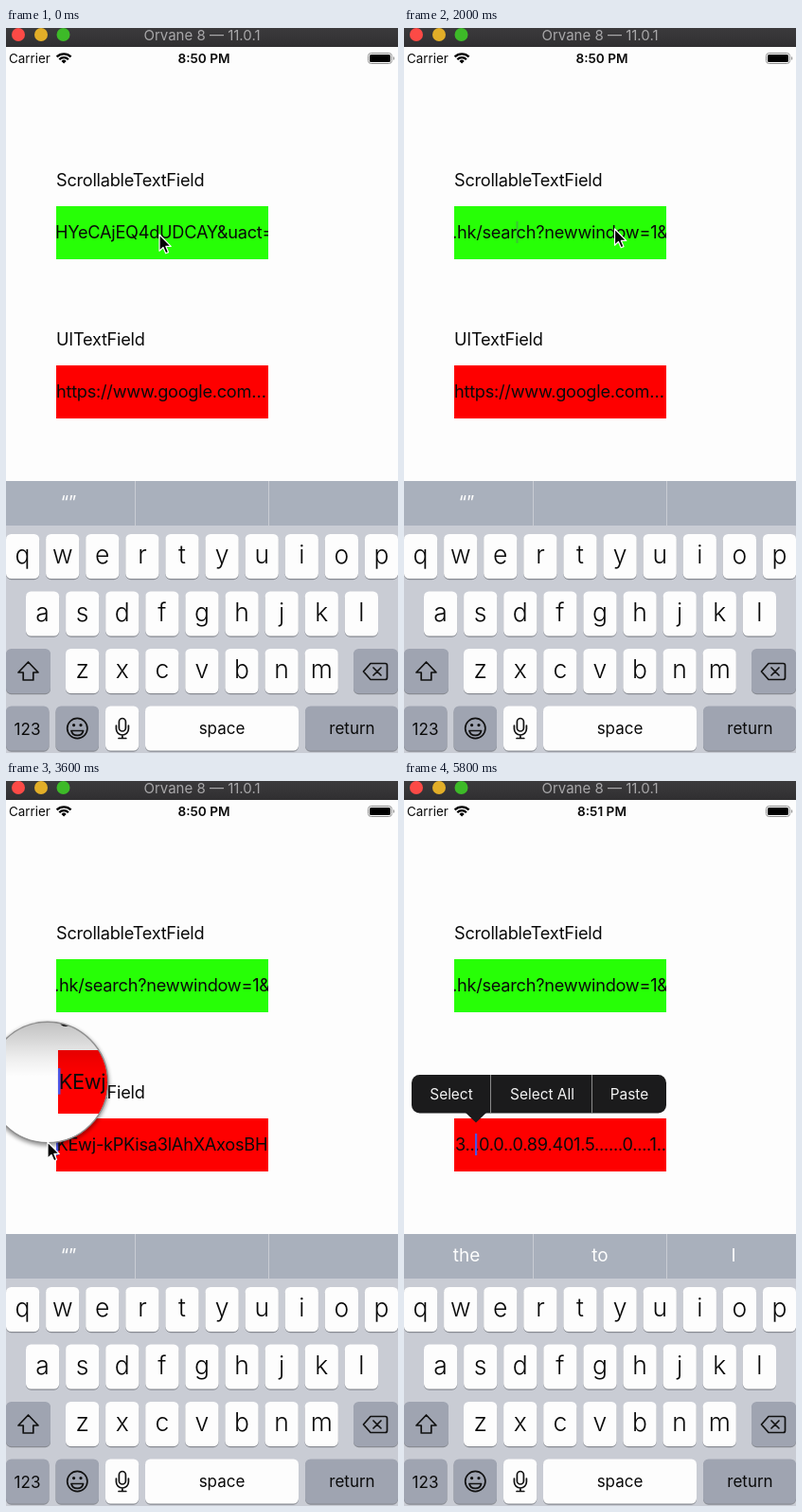
An HTML page for the animation above (6 s loop, 414 by 765 pixels).

```html
<!DOCTYPE html>
<html lang="en">
<head>
<meta charset="utf-8">
<title>Scrollable text field</title>
<style>
  html, body { margin: 0; width: 100%; height: 100%; overflow: hidden; background: #fdfdfd; }
  svg { display: block; }
  text { font-family: Inter, Roboto, "Liberation Sans", sans-serif; fill: #0a0a0a; white-space: pre; }
  .field { font-size: 18.2px; letter-spacing: -.26px; }
  .mid { text-anchor: middle; }
  .letter { font-size: 26.5px; font-weight: 350; }
  .cap { font-size: 17px; }
  .word { font-size: 19px; fill: #fdfdfd; }
  .menu { font-size: 15.4px; fill: #f4f4f4; }
  .icon { fill: none; stroke: #111; stroke-width: 1.7; stroke-linejoin: round; stroke-linecap: round; }
</style>
</head>
<body>
<svg width="414" height="765" viewBox="0 0 414 765">
  <defs>
    <linearGradient id="bar" x2="0" y2="1">
      <stop offset="0" stop-color="#3b3a3c"/><stop offset="1" stop-color="#302f31"/>
    </linearGradient>
    <linearGradient id="shade" x2="0" y2="1">
      <stop offset="0" stop-color="#000" stop-opacity=".24"/>
      <stop offset=".3" stop-color="#000" stop-opacity=".06"/>
      <stop offset=".45" stop-color="#000" stop-opacity="0"/>
    </linearGradient>
    <filter id="soft" x="-20%" y="-20%" width="140%" height="140%">
      <feGaussianBlur stdDeviation="2"/>
    </filter>
    <clipPath id="lens"><circle r="63.5"/></clipPath>
  </defs>

  <g id="page">
    <rect width="414" height="765" fill="#fdfdfd"/>
    <text class="field" x="53" y="167">ScrollableTextField</text>
    <text class="field" x="53" y="335">UITextField</text>
    <svg x="53" y="188" width="224" height="56">
      <rect width="224" height="56" fill="#27ff06"/>
      <rect id="greenCaret" x="65.5" y="16" width="2" height="23" fill="#4a9a55" opacity=".6"/>
      <text id="green" class="field" y="34"></text>
    </svg>
    <svg x="53" y="356" width="224" height="56">
      <rect width="224" height="56" fill="#fe0000"/>
      <text id="short" class="field" y="34">https://www.google.com…</text>
      <text id="red" class="field" y="34"></text>
      <rect id="redCaret" y="16" width="2.2" height="23" fill="#4a55e6"/>
    </svg>
  </g>

  <g id="status">
    <text x="3" y="36.5" font-size="13.4">Carrier</text>
    <g fill="none" stroke="#000" stroke-width="2.3">
      <path d="M53.6 30.4A10.6 10.6 0 0 1 68.6 30.4M56.3 33.2A6.8 6.8 0 0 1 65.9 33.2"/>
      <path d="M61.1 37.6L58.5 34.9A3.7 3.7 0 0 1 63.7 34.9Z" fill="#000" stroke="none"/>
    </g>
    <text id="clock" class="mid" x="209" y="36.5" font-size="13.6" font-weight="600"></text>
    <rect x="382.5" y="26.5" width="25" height="11" rx="3" fill="none" stroke="#8c8c8c"/>
    <rect x="384" y="28" width="22" height="8" rx="1.6"/>
    <path d="M409 30a2.2 2.2 0 0 1 0 4z" fill="#8c8c8c"/>
  </g>
  <g>
    <rect width="414" height="20" fill="url(#bar)"/>
    <circle cx="13" cy="7" r="7" fill="#fc4a46"/>
    <circle cx="37" cy="7" r="7" fill="#e2ae28"/>
    <circle cx="60.5" cy="7" r="7" fill="#3dba28"/>
    <text class="mid" x="207" y="13.3" font-size="15" style="fill:#a8a7a9">Orvane 8 — 11.0.1</text>
  </g>

  <g id="keyboard"></g>

  <g id="menu">
    <path d="M65 350H87L76 360.5Z" fill="#1b1b1c"/>
    <rect x="8" y="310" width="269" height="40.5" rx="8.5" fill="#1b1b1c"/>
    <path d="M91.5 310V350.5M198.5 310V350.5" stroke="#8b8b8b"/>
    <text class="menu mid" x="50" y="336">Select</text>
    <text class="menu mid" x="146" y="336">Select All</text>
    <text class="menu mid" x="238" y="336">Paste</text>
  </g>

  <g id="loupe">
    <circle cy="2" r="65" fill="#000" opacity=".4" filter="url(#soft)"/>
    <g clip-path="url(#lens)">
      <use id="zoom" href="#page"/>
      <circle r="64" fill="url(#shade)"/>
    </g>
    <circle r="63.7" fill="none" stroke="#8f8f8f" stroke-width="1.4"/>
  </g>

  <path id="pointer" d="M0 0V17.2L4 13.5L6.7 19.8L9.5 18.6L6.9 12.4H12.2Z"
        fill="#050505" stroke="#fff" stroke-width="1.2" stroke-linejoin="round"/>
</svg>

<script>
const LOOP = 6000, STEP = 200, LEFT = 53;
const URL_TEXT = 'https://www.google.com.hk/search?newwindow=1&ei=kL-sXb6jDMCNr7wPh4WKiAM' +
  '&q=scroll&oq=scroll&gs_l=psy-ab.3...0.0..0.89.401.5......0....1..gws-wiz.......0i71' +
  '&ved=0ahUKEwj-kPKisa3lAhXAxosBHYeCAjEQ4dUDCAY&uact=5';
const $ = id => document.getElementById(id);

// Keyboard
const key = (x, y, w, fill = '#fdfdfd', h = 47) =>
  `<rect x="${x}" y="${y + 1.2}" width="${w}" height="${h}" rx="5.5" fill="#888b92"/>` +
  `<rect x="${x}" y="${y}" width="${w}" height="${h}" rx="5.5" fill="${fill}"/>`;
const label = (cls, x, y, s) => `<text class="${cls} mid" x="${x}" y="${y}">${s}</text>`;
const GREY = '#9fa4b1';

function keyboard() {
  let out = '<rect y="478" width="414" height="287" fill="#c9ccd4"/>' +
    '<rect y="478" width="414" height="47" fill="#a9b0bc"/>' +
    '<path d="M136.5 478V525M277.5 478V525" stroke="#c9ccd4"/>';
  const rows = [['qwertyuiop', 0, 534], ['asdfghjkl', 21, 594.5], ['zxcvbnm', 63, 655]];
  for (const [chars, x0, y] of rows) {
    [...chars].forEach((c, i) => {
      const x = x0 + i * 42.1;
      out += key(x, y, 35.2) + label('letter', x + 17.6, y + 31.3, c);
    });
  }
  out += key(0, 655, 47, GREY) + key(367, 655, 47, GREY) +
    key(0, 715.5, 45.5, GREY) + key(52.5, 715.5, 45.5, GREY) + key(105, 715.5, 35.2) +
    key(147, 715.5, 162) + key(316, 715.5, 98, GREY) +
    label('cap', 22.5, 745.5, '123') + label('cap', 228, 745, 'space') + label('cap', 365.5, 745, 'return');
  out += `<g class="icon">
    <path d="M23.5 669L34 680H28.8V688H18.2V680H13Z"/>
    <path d="M385 670.5H400.5Q402.5 670.5 402.5 672.5V685.5Q402.5 687.5 400.5 687.5H385L377.5 679ZM388 675L396 683M396 675L388 683"/>
    <circle cx="75.3" cy="739" r="10.6"/>
    <path d="M69 741.5H81.6A6.4 6 0 0 1 69 741.5Z"/>
    <circle cx="71.6" cy="735.6" r=".8" fill="#111"/><circle cx="79" cy="735.6" r=".8" fill="#111"/>
    <rect x="119.4" y="728.5" width="7" height="13.5" rx="3.5"/>
    <path d="M116.4 736V739.5A6.5 6.5 0 0 0 129.4 739.5V736M122.9 746V749.5M119 749.5H126.8"/>
  </g>`;
  out += [66, 207, 348].map(x => label('word', x, 507, '')).join('');
  return out;
}
$('keyboard').innerHTML = keyboard();
const words = document.querySelectorAll('.word');

// Linear interpolation over rows of [time, ...values]
function at(table, t) {
  const n = table.findIndex(r => r[0] > t);
  if (n < 0) return table[table.length - 1].slice(1);
  if (n === 0) return table[0].slice(1);
  const a = table[n - 1], b = table[n], p = (t - a[0]) / (b[0] - a[0]);
  return a.slice(1).map((v, i) => v + (b[i + 1] - v) * p);
}

// Rows of [time, substring, stage x of that substring] become text offsets
function scrollTable(el, rows) {
  el.textContent = URL_TEXT;
  return rows.map(([t, part, x]) => {
    const i = URL_TEXT.indexOf(part);
    return [t, x - LEFT - el.getSubStringLength(0, i)];
  });
}
const greenScroll = scrollTable($('green'), [
  [0, 'HYeC', 52], [1200, '6jDM', 56], [2000, 'hk/', 56]
]);
const redScroll = scrollTable($('red'), [
  [3200, 'CAjEQ', 52.5], [3600, 'KEwj', 53.5], [4600, '89.401', 53], [4800, '3...', 54]
]);

const pointerPath = [
  [0, 162, 218], [200, 232, 217], [400, 178, 216], [600, 112, 215], [800, 205, 214],
  [1000, 150, 213], [1200, 121.5, 213], [1400, 196, 212], [1600, 236, 212], [1800, 165, 212],
  [2000, 222.5, 212], [2200, 215, 245], [2400, 165, 335], [2600, 115, 377], [2800, 108, 375],
  [3000, 86, 375], [3600, 44, 381], [4000, 28, 382], [4600, 20.5, 382], [4800, 76, 382],
  [5000, 76, 382], [5200, 190, 420], [5400, 340, 455]
];
const loupePath = [
  [2800, 110, 314], [3000, 103, 314], [3200, 78, 317], [3600, 44, 318],
  [4000, 28, 318], [4600, 20.5, 318], [4800, 76, 318]
];
const caretPath = [[2800, 110], [3000, 107], [3200, 80], [3400, 53], [4600, 53], [4800, 75]];

const show = (id, on) => $(id).setAttribute('visibility', on ? 'visible' : 'hidden');
const move = (id, x, y) => $(id).setAttribute('transform', `translate(${x} ${y})`);

function draw(now) {
  const t = Math.floor((now % LOOP) / STEP) * STEP;
  const editing = t >= 2600, released = t >= 5200;

  $('green').setAttribute('x', at(greenScroll, t)[0]);
  $('red').setAttribute('x', at(redScroll, t)[0]);
  $('redCaret').setAttribute('x', at(caretPath, t)[0] - LEFT);
  show('greenCaret', t >= 2000 && t < 2400);
  show('short', !editing);
  show('red', editing);
  show('redCaret', editing);

  const [cx, cy] = at(loupePath, t);
  move('loupe', cx, cy);
  $('zoom').setAttribute('transform', `translate(${-1.2 * cx} ${317.5 - cy - 1.2 * 384}) scale(1.2)`);
  $('loupe').style.display = t >= 2800 && !released ? '' : 'none';

  const [px, py] = at(pointerPath, t);
  move('pointer', px, py);
  show('pointer', t < 5600);
  show('menu', t >= 5400);

  $('clock').textContent = t >= 5000 ? '8:51 PM' : '8:50 PM';
  const hints = released ? ['the', 'to', 'I'] : ['“”', '', ''];
  words.forEach((w, i) => { w.textContent = hints[i]; });
}

function frame() {
  draw(performance.now());
  requestAnimationFrame(frame);
}
frame();
</script>
</body>
</html>
```
